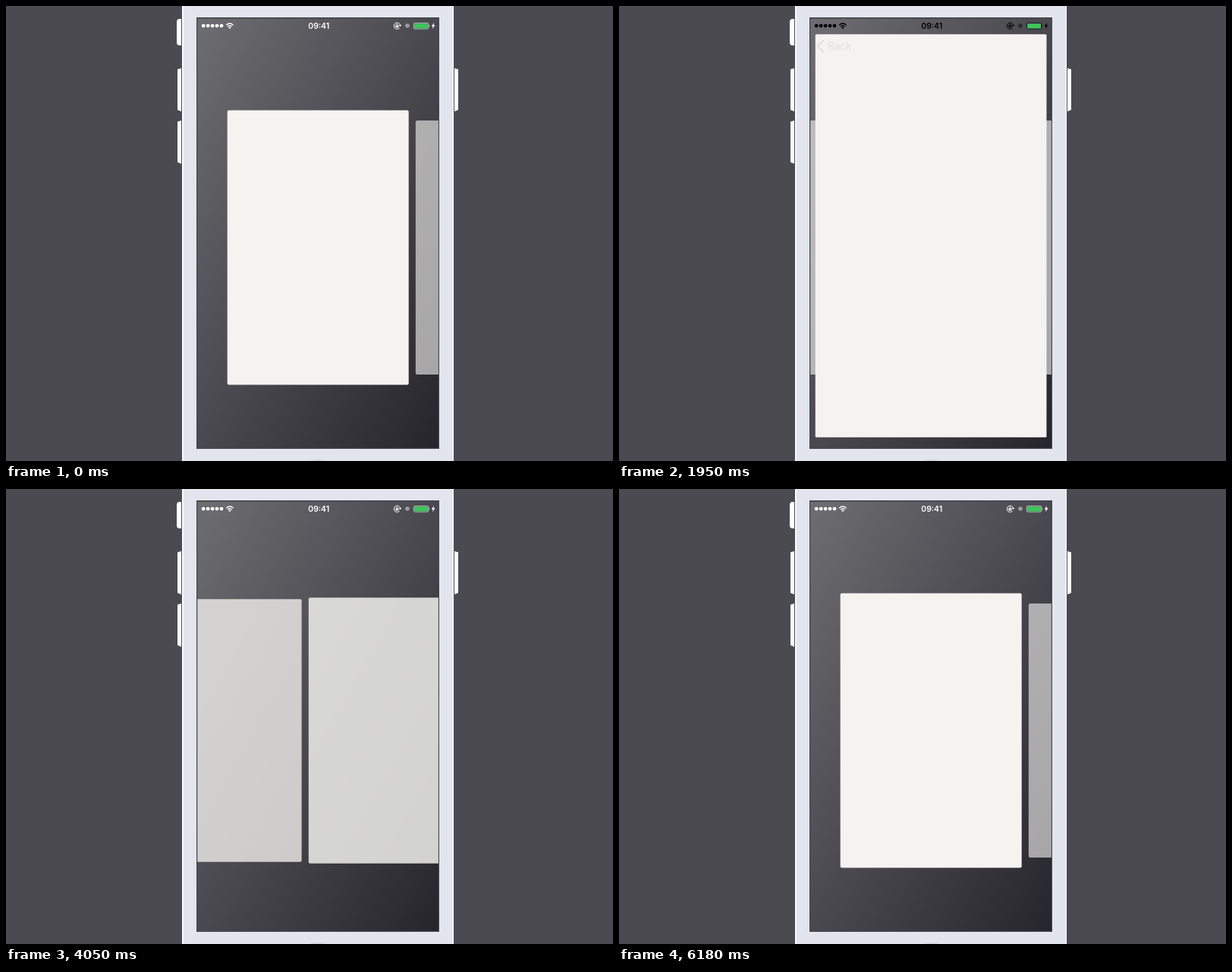
Recreate the animation shown at these times as an HTML page. Size 800 px wide and 600 px high, loop 6420 ms.

```html
<!DOCTYPE html>
<html lang="en">
<head>
<meta charset="utf-8">
<title>Card carousel</title>
<style>
  html, body { margin: 0; width: 100%; height: 100%; overflow: hidden; background: #4b4a50; }
  svg { display: block; width: 100vw; height: 100vh; }
  text { font-family: Inter, Roboto, "Liberation Sans", sans-serif; }
</style>
</head>
<body>
<svg viewBox="0 0 800 600">
  <defs>
    <linearGradient id="wall" x1="0" y1="0" x2="1" y2="1">
      <stop offset="0" stop-color="#6e6d71"/>
      <stop offset=".5" stop-color="#4a4950"/>
      <stop offset="1" stop-color="#26252c"/>
    </linearGradient>
    <clipPath id="screen"><rect x="252.3" y="16.7" width="317.6" height="566"/></clipPath>
  </defs>

  <rect width="800" height="600" fill="#4b4a50"/>
  <g fill="#fff">
    <path d="M231 17H229Q225 17 225 21V48Q225 52 229 52H231Z"/>
    <path d="M231 82L226 83.5V137L231 139Z"/>
    <path d="M231 151L226 152.5V206L231 208Z"/>
    <path d="M591 82L596 83.5V137L591 139Z"/>
    <rect x="232" width="358" height="600"/>
  </g>
  <rect x="233.7" width="355.2" height="600" fill="#e2e5ed"/>
  <circle cx="411.5" cy="635" r="37" fill="#d5d6da"/>
  <rect x="251" y="15" width="320" height="569" fill="#47464c"/>

  <g clip-path="url(#screen)">
    <rect x="252" y="16" width="318" height="567" fill="url(#wall)"/>
    <g id="cards" fill="#f4f3ef"></g>
    <rect id="sheet" fill="#f4f3ef"/>
    <path id="chevron" d="M269.8 45L261.3 53L269.8 61" fill="none" stroke="#000" stroke-width="2.5"/>
    <text id="back" x="275" y="58" font-size="14" letter-spacing="-.35">Back</text>
    <g id="status" fill="currentColor">
      <g id="dots"></g>
      <g fill="none" stroke="currentColor" stroke-width="1.3">
        <path d="M290.2 25.2Q294.9 20.8 299.6 25.2"/>
        <path d="M292.1 27.2Q294.9 24.7 297.7 27.2"/>
      </g>
      <path d="M293.2 28.5Q294.9 27.2 296.6 28.5L294.9 30.2Z"/>
      <text x="412.2" y="30" font-size="10.4" font-weight="600" text-anchor="middle">09:41</text>
      <path d="M518.6 29.1A4.2 4.2 0 1 1 519.6 25.2" fill="none" stroke="currentColor"/>
      <path d="M517.8 25H521.2L519.5 27.3Z"/>
      <rect x="513.4" y="25.6" width="4" height="2.8"/>
      <path d="M514.2 25.8V25A1.2 1.2 0 0 1 516.6 25V25.8" fill="none" stroke="currentColor" stroke-width=".8"/>
      <circle cx="529" cy="26" r="2.8" opacity=".45"/>
      <rect x="537.4" y="22.4" width="19.4" height="7.8" rx="1.5" fill="none" stroke="currentColor" stroke-width=".8" opacity=".75"/>
      <rect x="538.2" y="23.2" width="17.8" height="6.2" rx=".8" fill="#3cc65c"/>
      <path d="M557.4 24.6Q559 26.2 557.4 27.8Z"/>
      <path d="M564 22L560.8 26.7H562.7L562 30.2L565.6 25.3H563.5Z"/>
    </g>
  </g>
</svg>
<script>
const LOOP = 6420;
const CARD = { x: 411.2, y: 318.5, w: 239, h: 362 };
const FULL = { x: 411.1, y: 299.8, w: 318.4, h: 567 };
const GAP = 239.2;
const SWIPES = [
  [[690, 0], [840, .1], [960, .5], [1080, .95], [1140, 1.03], [1200, 1.044], [1320, 1.03], [1500, 1.008], [1650, 1]],
  [[3560, 1], [3750, .95], [3900, .83], [4050, .571], [4140, .22], [4230, .04], [4350, 0]]
];
const VISITS = [[1850, 2845], [4525, 5195]];

const $ = id => document.getElementById(id);
const mix = (a, b, k) => a + (b - a) * k;
const clamp = k => Math.min(1, Math.max(0, k));
const smooth = k => (k = clamp(k), k * k * (3 - 2 * k));

function add(parent, tag, attrs) {
  const el = document.createElementNS("http://www.w3.org/2000/svg", tag);
  set(el, attrs);
  return parent.appendChild(el);
}

function set(el, attrs) {
  for (const key in attrs) el.setAttribute(key, attrs[key]);
}

function place(el, x, y, w, h, rx) {
  set(el, { x: x - w / 2, y: y - h / 2, width: w, height: h, rx });
}

for (let i = 0; i < 5; i++) add($("dots"), "circle", { cx: 260.2 + i * 5.95, cy: 26.1, r: 2.45 });
const cards = [0, 1, 2].map(() => add($("cards"), "rect", {}));

// Cubic curve through [time, value] points, at rest at both ends.
function curve(pts, t) {
  const last = pts.length - 1;
  if (t <= pts[0][0]) return pts[0][1];
  if (t >= pts[last][0]) return pts[last][1];
  const slope = i => i === 0 || i === last ? 0
    : (pts[i + 1][1] - pts[i - 1][1]) / (pts[i + 1][0] - pts[i - 1][0]);
  const i = pts.findIndex(p => p[0] > t) - 1;
  const [t0, a] = pts[i], [t1, b] = pts[i + 1];
  const d = t1 - t0, k = (t - t0) / d;
  return mix(a, b, k * k * (3 - 2 * k))
    + d * k * (1 - k) * (slope(i) * (1 - k) - slope(i + 1) * k);
}

// Underdamped spring from 0 to 1, ms after its start.
function spring(ms) {
  if (ms <= 0) return 0;
  const t = ms / 1000, freq = 25, damp = .78;
  const root = Math.sqrt(1 - damp * damp), a = freq * root * t;
  return 1 - Math.exp(-damp * freq * t) * (Math.cos(a) + damp / root * Math.sin(a));
}

function draw(t) {
  const scroll = t < 3000 ? curve(SWIPES[0], t) : curve(SWIPES[1], t);
  const [open, close] = VISITS[t < 3500 ? 0 : 1];
  const up = t - open, down = t - close;
  const grow = spring(up) - spring(down);
  const current = Math.round(scroll);
  const active = up > 0 && down < 600;

  cards.forEach((card, i) => {
    const off = i - scroll, d = Math.abs(off), size = 1 - .075 * d;
    place(card, CARD.x + off * GAP, CARD.y, CARD.w * size, CARD.h * size, 2);
    set(card, { opacity: active && i === current ? 0 : Math.max(0, 1 - .38 * d) });
  });

  const at = key => mix(CARD[key], FULL[key], grow);
  place($("sheet"), at("x"), at("y"), at("w"), at("h"), 2 * clamp(1.5 - grow * 1.5 + .5));
  if (up > 350 && down < 0) place($("sheet"), FULL.x, FULL.y, FULL.w, FULL.h, 0);
  set($("sheet"), { opacity: active ? 1 : 0 });

  const shown = smooth((up - 60) / 250);
  set($("back"), { opacity: shown * (1 - smooth(down / 300)) });
  set($("chevron"), { opacity: shown * (1 - smooth(down / 240)) });

  const ink = Math.round(255 * (1 - clamp(up / 90) + clamp(down / 120)));
  $("status").style.color = `rgb(${ink},${ink},${ink})`;
}

const start = performance.now();
function tick() {
  draw((performance.now() - start) % LOOP);
  requestAnimationFrame(tick);
}
tick();
</script>
</body>
</html>
```
